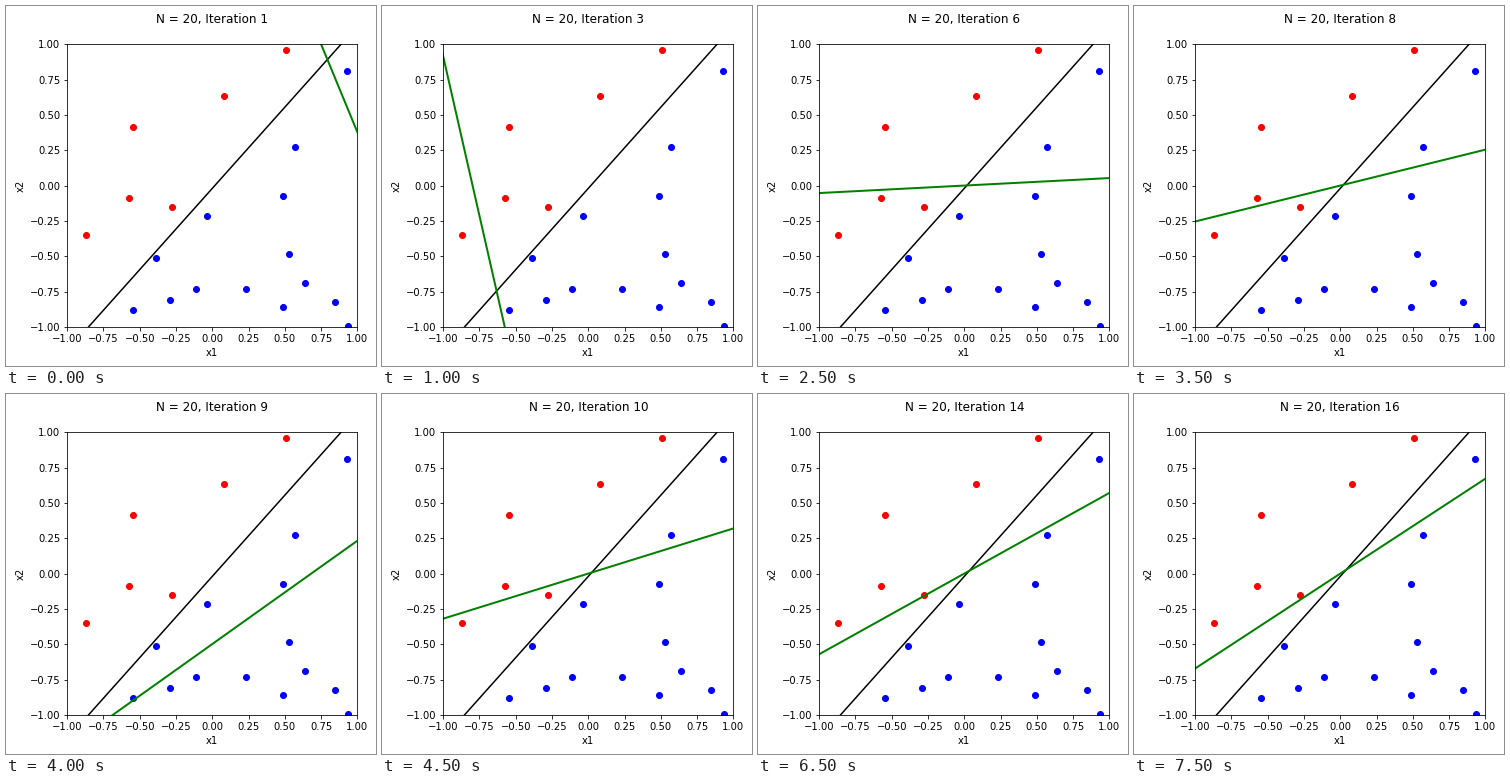
Animation, 370 px wide and 360 px high, one loop 8 s. Source, as a matplotlib script:

```python
import numpy as np
import matplotlib.pyplot as plt
from matplotlib.animation import FuncAnimation

W, H, DPI = 370, 360, 72
STEPS = 16
SLOPE, OFFSET = 1.149, -0.02  # true boundary: x2 = SLOPE * x1 + OFFSET

plt.rcParams.update({
    "font.family": "DejaVu Sans",
    "font.size": 10,
    "text.kerning_factor": 6,
})

# Sample points, in the order the learner checks them
points = np.array([
    (-0.868, -0.349), (0.083, 0.632), (0.510, 0.957), (-0.545, -0.880),
    (-0.386, -0.512), (0.931, 0.809), (0.572, 0.272), (0.490, -0.074),
    (-0.034, -0.216), (0.531, -0.484), (0.641, -0.689), (-0.110, -0.731),
    (0.234, -0.731), (-0.290, -0.809), (0.490, -0.859), (0.848, -0.823),
    (0.938, -0.993), (-0.545, 0.413), (-0.572, -0.088), (-0.276, -0.152),
])
x1, x2 = points.T
labels = np.where(x2 > SLOPE * x1 + OFFSET, 1, -1)


def perceptron(steps):
    """Weights after each step; a step corrects the first misclassified point."""
    samples = np.column_stack([np.ones(len(points)), points])
    w = np.zeros(3)
    history = []
    for _ in range(steps):
        wrong = np.argmax(labels * (samples @ w) <= 0)
        w = w + labels[wrong] * samples[wrong]
        history.append(w)
    return history


weights = perceptron(STEPS)

fig = plt.figure(figsize=(W / DPI, H / DPI), dpi=DPI, facecolor="white")
ax = fig.add_axes([61.2 / W, 39.1 / H, 290.16 / W, 282.67 / H])
ax.set(xlim=(-1, 1), ylim=(-1, 1), xlabel="x1", ylabel="x2")
for axis in (ax.xaxis, ax.yaxis):
    axis.set_major_locator(plt.MultipleLocator(0.25))

xs = np.array([-1.5, 1.5])
ax.plot(xs, SLOPE * xs + OFFSET, "k-", lw=1.5)
for label, style in ((1, "ro"), (-1, "bo")):
    ax.plot(*points[labels == label].T, style, ms=6)
guess, = ax.plot([], [], "g-", lw=2)
title = ax.set_title("", fontsize=12)


def update(i):
    w0, w1, w2 = weights[i]
    guess.set_data(xs, -(w0 + w1 * xs) / w2)
    title.set_text(f"N = {len(points)}, Iteration {i + 1}\n")
    return guess, title


anim = FuncAnimation(fig, update, frames=STEPS, interval=500,
                     repeat=True, repeat_delay=0)
plt.show()
```
